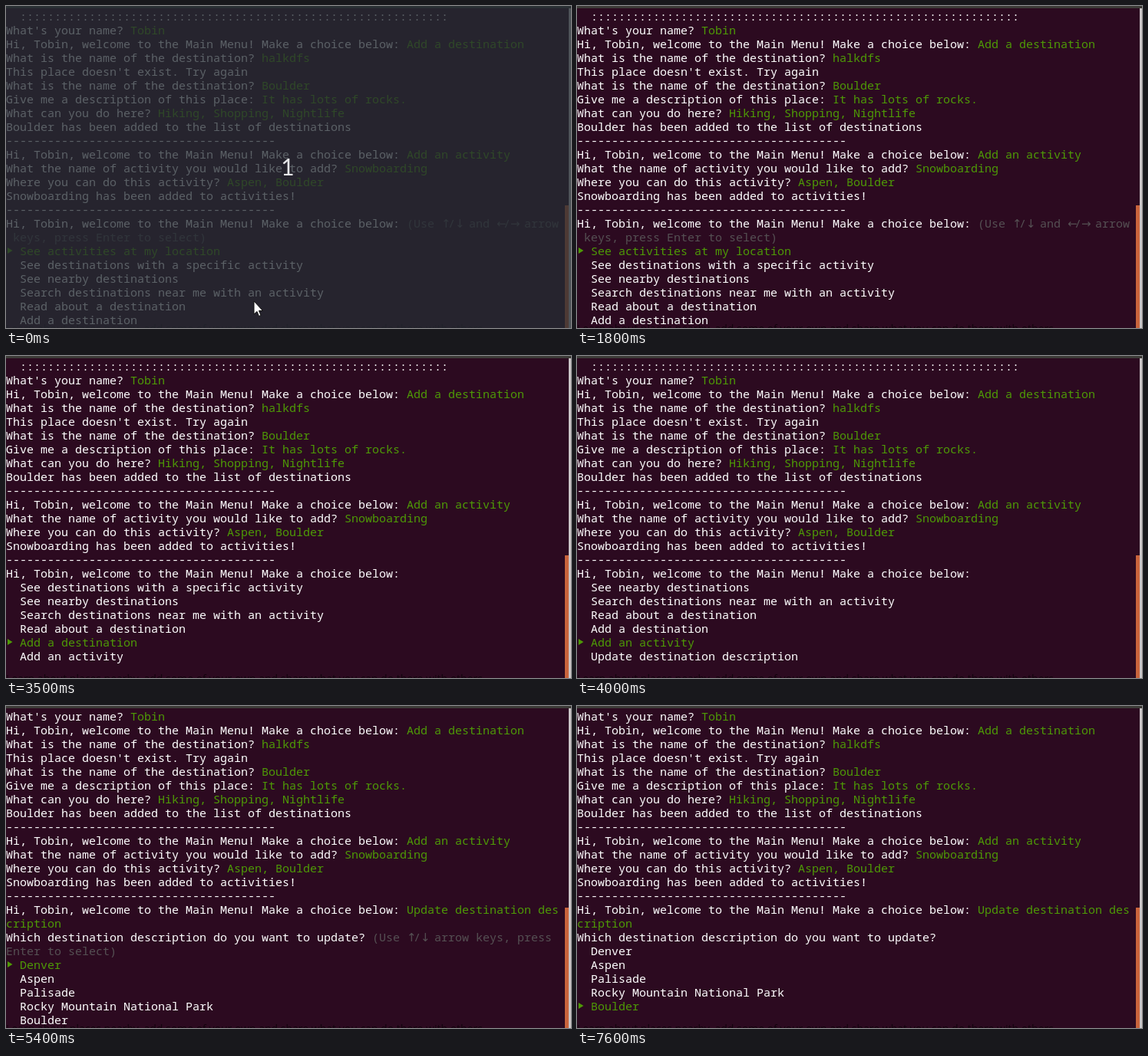
Recreate the animation shown at these times as an HTML page with a canvas. Size 736 px wide and 420 px high, loop 8 s.

```html
<!DOCTYPE html>
<html lang="en">
<head>
<meta charset="utf-8">
<title>Travel menu in a terminal</title>
<style>
  html, body { margin: 0; width: 100%; height: 100%; overflow: hidden; background: #2c0a20; }
  canvas { display: block; }
</style>
</head>
<body>
<canvas id="stage" width="736" height="420"></canvas>
<script>
const ctx = document.getElementById('stage').getContext('2d');
const LOOP = 8000, CELL = 9, LINE = 18, BASE = 19;
const WHITE = '#fff', GREEN = '#4e9a06', GREY = '#555053', BACK = '#2c0a20';
const MONO = '15px "Noto Sans Mono", monospace';
const WIDE = '15px "DejaVu Sans", sans-serif';

// In a line, "|" switches to green and "~" to grey.
const RULE = '-'.repeat(39);
const PROMPT = 'Hi, Tobin, welcome to the Main Menu! Make a choice below: ';
const LOG = [
  '  ' + ':'.repeat(62),
  "What's your name? |Tobin",
  PROMPT + '|Add a destination',
  'What is the name of the destination? |halkdfs',
  "This place doesn't exist. Try again",
  'What is the name of the destination? |Boulder',
  'Give me a description of this place: |It has lots of rocks.',
  'What can you do here? |Hiking, Shopping, Nightlife',
  'Boulder has been added to the list of destinations',
  RULE,
  PROMPT + '|Add an activity',
  'What the name of activity you would like to add? |Snowboarding',
  'Where you can do this activity? |Aspen, Boulder',
  'Snowboarding has been added to activities!',
  RULE
];
const MENU = [
  'See activities at my location',
  'See destinations with a specific activity',
  'See nearby destinations',
  'Search destinations near me with an activity',
  'Read about a destination',
  'Add a destination',
  'Add an activity',
  'Update destination description',
  'Remove record'
];
const PLACES = ['Denver', 'Aspen', 'Palisade', 'Rocky Mountain National Park', 'Boulder'];
const UPDATE = 'Which destination description do you want to update? ';

// Times at which the selection moves down by one.
const MENU_KEYS = [2000, 2300, 2600, 3000, 3500, 4000, 4500];
const PLACE_KEYS = [6500, 6800, 7200, 7600];
const PLACES_AT = 5400;

const pressed = (keys, t) => keys.filter(k => t >= k).length;

function rect(color, x, y, w, h) {
  ctx.fillStyle = color;
  ctx.fillRect(x, y, w, h);
}

function shape(color, points) {
  ctx.fillStyle = color;
  ctx.beginPath();
  points.forEach(([x, y]) => ctx.lineTo(x, y));
  ctx.closePath();
  ctx.fill();
}

function drawLine(line, row) {
  const y = BASE + row * LINE;
  let col = 0;
  ctx.fillStyle = WHITE;
  for (const part of line.split(/([|~↑↓←→])/)) {
    if (part === '|') ctx.fillStyle = GREEN;
    else if (part === '~') ctx.fillStyle = GREY;
    else {
      ctx.font = /[↑↓←→]/.test(part) ? WIDE : MONO;
      ctx.fillText(part, col * CELL, y);
      col += part.length;
    }
  }
}

function drawMarker(row) {
  const y = BASE - 6 + row * LINE;
  shape(GREEN, [[2, y - 4], [8.5, y], [2, y + 4]]);
}

// Returns the lines on screen and the row of the selected item.
function screen(t) {
  const inMenu = t < PLACES_AT;
  const sel = pressed(inMenu ? MENU_KEYS : PLACE_KEYS, t);
  const lines = inMenu
    ? [...LOG, PROMPT]
    : [...LOG.slice(1), PROMPT + '|Update destination des', '|cription', UPDATE];
  if (!sel) {
    lines[lines.length - 1] += inMenu ? '~(Use ↑/↓ and ←/→ arrow' : '~(Use ↑/↓ arrow keys, press';
    lines.push(inMenu ? '~ keys, press Enter to select)' : '~Enter to select)');
  }
  const top = inMenu ? Math.max(0, sel - 4) : 0;
  const items = (inMenu ? MENU : PLACES).slice(top, top + 6);
  const marked = lines.length + sel - top;
  items.forEach((item, i) => lines.push((i + top === sel ? '|' : '') + '  ' + item));
  return { lines, marked };
}

function drawTerminal(t) {
  rect(BACK, 0, 0, 736, 420);
  // Dark text of a window behind, cut off by the lower edge.
  ctx.font = '14px "Open Sans", sans-serif';
  ctx.fillStyle = '#12040d';
  ctx.fillText('Learn about places nearby, add some of your own and share what you can do there with others', 0, 426);
  rect('#3c3b37', 0, 0, 736, 3);

  const { lines, marked } = screen(t);
  lines.forEach(drawLine);
  drawMarker(marked);

  rect('#c9643c', 728, t < PLACES_AT ? 260 : 263, 5, 160);
  rect('#cbc6c8', 733, 3, 3, 417);
}

function drawCountdown() {
  rect('rgba(36,44,51,.75)', 0, 0, 736, 420);
  ctx.font = '30px Lato, sans-serif';
  ctx.fillStyle = '#e6e6e8';
  ctx.textAlign = 'center';
  ctx.fillText('1', 367, 221);
  ctx.textAlign = 'left';
  const arrow = [[323, 385], [323, 402], [327, 398.5], [329.5, 404.5], [332, 403.5], [329.5, 397.5], [334.5, 397.5]];
  shape('#fff', arrow);
  ctx.strokeStyle = '#111';
  ctx.lineWidth = 1;
  ctx.stroke();
}

function drawBeam() {
  const color = '#e4e8cf';
  rect(color, 325, 382, 1, 12);
  for (const y of [381, 394]) {
    rect(color, 323, y, 2, 1);
    rect(color, 326, y, 2, 1);
  }
}

function frame(now) {
  const t = now % LOOP;
  drawTerminal(t);
  if (t < 500) drawCountdown();
  else if (t < 1800) drawBeam();
  requestAnimationFrame(frame);
}

let start;
requestAnimationFrame(function begin(now) {
  start = now;
  const tick = time => {
    const t = (time - start) % LOOP;
    drawTerminal(t);
    if (t < 500) drawCountdown();
    else if (t < 1800) drawBeam();
    requestAnimationFrame(tick);
  };
  tick(now);
});
</script>
</body>
</html>
```
